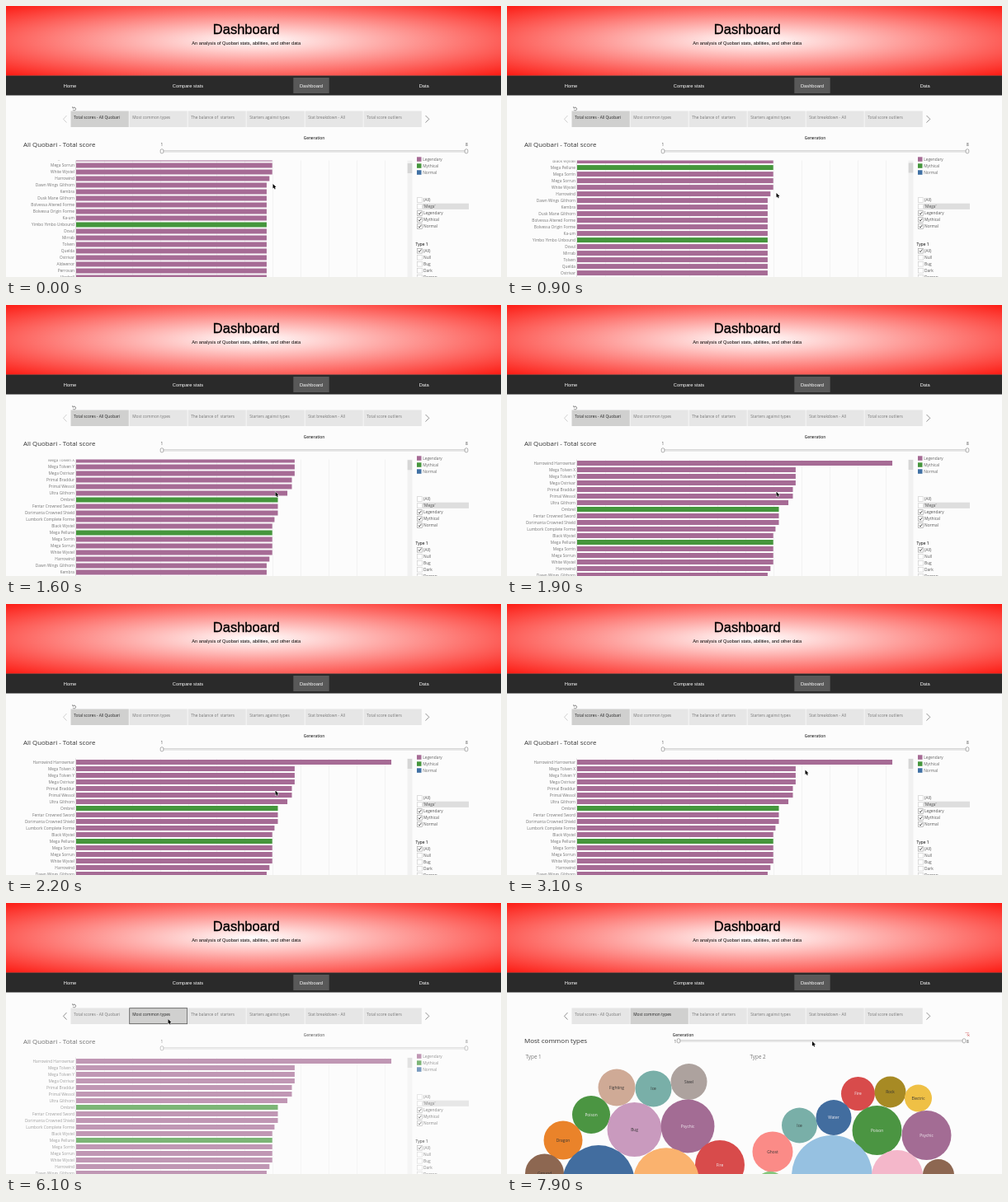
An HTML page with a canvas that plays this animation: 600 by 329 pixels, repeating every 8 s.

```html
<!DOCTYPE html>
<html lang="en">
<head>
<meta charset="utf-8">
<title>Dashboard</title>
<style>
html, body { margin: 0; width: 600px; height: 329px; overflow: hidden; background: #fcfcfc; }
canvas { display: block; width: 600px; height: 329px; }
</style>
</head>
<body>
<canvas id="stage"></canvas>
<script>
const LOOP = 8000, STEP = 100, ROW = 8;
const SELECT = 5900, SWAP = 6500;
const SANS = '"Open Sans", "Noto Sans", sans-serif';
const ARIAL = '"Liberation Sans", Arial, sans-serif';
const PURPLE = '#a66b95', GREEN = '#45963c', BLUE = '#4070a4';

const canvas = document.getElementById('stage');
const c = canvas.getContext('2d');
const dpr = window.devicePixelRatio || 1;
canvas.width = 600 * dpr;
canvas.height = 329 * dpr;

// Total points, then the names that share them; * marks a mythical entry.
const groups = [
  [1125, 'Harrowind Harrowmar'],
  [780, 'Mega Tolven X', 'Mega Tolven Y', 'Mega Ostrivar'],
  [770, 'Primal Braddur', 'Primal Wessol'],
  [754, 'Ultra Gilthorn'],
  [720, '*Ombrel', 'Fentar Crowned Sword', 'Dorimanta Crowned Shield'],
  [708, 'Lumbork Complete Forme'],
  [700, 'Black Wystel', '*Mega Pellune', 'Mega Sorrin', 'Mega Sorrun', 'White Wystel'],
  [690, 'Harrowind'],
  [680, 'Dawn Wings Gilthorn', 'Kembra', 'Dusk Mane Gilthorn', 'Bolvessa Altered Forme',
    'Bolvessa Origin Forme', 'Ka-um', '*Yimbo Yimbo Unbound', 'Dovul', 'Mirrab', 'Tolven',
    'Quelda', 'Ostrivar', 'Aldwenor', 'Perrovan', 'Vindrell', 'Yorvane', 'Zemlith']
];
const rows = groups.flatMap(([points, ...names]) => names.map(name => ({ points, name })));

const tabs = ['Total scores - All Quobari', 'Most common types', 'The balance of  starters',
  'Starters against types', 'Stat breakdown - All', 'Total score outliers'];

const details = [['legend_myth:', 'Legendary'], ['Name:', 'Harrowind Harrowmar'],
  ['Species:', 'Gigantic Quobari'], ['Type 1:', 'Poison'], ['Type 2:', 'Dragon'],
  ['Attack:', '115.0'], ['Defense:', '250.0'], ['Height M:', '100.00'], ['Hp:', '255.0'],
  ['Sp Attack:', '125.0'], ['Sp Defense:', '250.0'], ['Speed:', '130.0'],
  ['Total Points:', '1,125.0'], ['Weight Kg:', '']];

const DARK = '#333', LIGHT = '#f2eef2';
const bubbles = [
  [133, 224, 22.5, '#cfaa96', 'Fighting', DARK], [177.5, 225.5, 22, '#79afa8', 'Ice', DARK],
  [220.5, 217, 22, '#ada29e', 'Steel', DARK], [102, 257, 23, '#4b9542', 'Poison', LIGHT],
  [154.5, 275, 33, '#c99abe', 'Bug', DARK], [219, 271, 32.5, '#a36c94', 'Psychic', LIGHT],
  [68, 288, 23.5, '#ea832a', 'Dragon', DARK], [258, 318, 30, '#d84b4b', 'Fire', LIGHT],
  [45.5, 328, 23.5, '#8d6751', 'Ground', DARK], [111, 337.5, 43.4, '#426d9f', 'Water', LIGHT],
  [193, 337, 39.8, '#fab26e', 'Normal', DARK],
  [425.5, 231.5, 20.5, '#d84b4b', 'Fire', LIGHT], [464.5, 229.5, 19, '#a78a24', 'Rock', DARK],
  [498.5, 237, 16.5, '#efc045', 'Electric', DARK], [354.5, 270, 21.5, '#79afa8', 'Ice', DARK],
  [396, 260.5, 21.5, '#426d9f', 'Water', LIGHT], [448.5, 276, 30, '#4b9542', 'Poison', LIGHT],
  [508.5, 282, 30, '#a36c94', 'Psychic', LIGHT], [322, 302, 24.5, '#fb8b87', 'Ghost', DARK],
  [394, 331, 49, '#96c1e1', '', DARK], [473, 331, 31, '#f4b7ca', 'Fairy', DARK],
  [523, 330, 19, '#8d6751', '', DARK], [319, 345, 19, '#86c67c', '', DARK]
];

const scrollKeys = [[700, 110.5], [1200, 64], [1600, 11.5], [1800, 0]];
const cursorKeys = [[0, 323.5, 216], [600, 326.5, 227], [2600, 326.5, 226.5], [3300, 375.5, 191.5],
  [4800, 375.5, 191.5], [5600, 196.5, 141], [7100, 196.5, 141], [7700, 370, 168]];

// Linear track through [time, ...values] keys.
function track(keys, t) {
  const next = keys.findIndex(k => k[0] > t);
  if (next < 0) return keys[keys.length - 1].slice(1);
  if (next === 0) return keys[0].slice(1);
  const a = keys[next - 1], b = keys[next];
  const p = (t - a[0]) / (b[0] - a[0]);
  return a.slice(1).map((v, i) => v + (b[i + 1] - v) * p);
}

function rect(x, y, w, h, fill) {
  c.fillStyle = fill;
  c.fillRect(x, y, w, h);
}

function text(s, x, y, size, fill, { align = 'left', font = SANS, weight = 400 } = {}) {
  c.font = `${weight} ${size}px ${font}`;
  c.textAlign = align;
  c.textBaseline = 'alphabetic';
  c.fillStyle = fill;
  c.fillText(s, x, y + size * 0.36);
}

function line(points, color, width = 0.7) {
  c.beginPath();
  points.forEach(([x, y]) => c.lineTo(x, y));
  c.strokeStyle = color;
  c.lineWidth = width;
  c.stroke();
}

function disc(x, y, r, fill) {
  c.beginPath();
  c.arc(x, y, r, 0, 7);
  c.fillStyle = fill;
  c.fill();
}

function header() {
  c.save();
  c.translate(300, 42);
  c.scale(300, 42);
  const glow = c.createRadialGradient(0, 0, 0, 0, 0, Math.SQRT2);
  glow.addColorStop(0, '#fff');
  glow.addColorStop(1, '#fc1c14');
  rect(-1, -1, 2, 2.02, glow);
  c.restore();

  const arial = { align: 'center', font: ARIAL };
  text('Dashboard', 291.2, 28.5, 16.5, '#000', arial);
  c.strokeStyle = '#000';
  c.lineWidth = 0.35;
  c.strokeText('Dashboard', 291.2, 28.5 + 16.5 * 0.36);
  text('An analysis of Quobari stats, abilities, and other data', 291.2, 44.7, 5.65, '#000', arial);

  rect(0, 84.5, 600, 24, '#2a2a2a');
  rect(348.3, 87, 43.4, 19, '#595959');
  [['Home', 77.5], ['Compare stats', 220.5], ['Dashboard', 370], ['Data', 506.7]]
    .forEach(([s, x]) => text(s, x, 96.7, 5.75, '#fff', arial));
}

function tabStrip(active, outlined) {
  tabs.forEach((name, i) => {
    const x = 78.5 + 71 * i, on = i === active;
    rect(x, 127.5, 70.3, 19.5, on ? '#d0d0cf' : '#e6e6e6');
    text(name, x + 3.7, 135.2, 4.83, on ? '#222' : '#777');
    if (on && outlined) {
      c.strokeStyle = '#555';
      c.lineWidth = 0.8;
      c.strokeRect(x + 0.2, 127.7, 70, 19);
    }
  });
  line([[73.5, 133], [69.5, 137.3], [73.5, 141.6]], active ? '#777' : '#c4c4c4', 0.8);
  line([[508.5, 133], [512.8, 137.3], [508.5, 141.6]], '#777', 0.8);
}

function undoIcon() {
  c.beginPath();
  c.arc(82.7, 125, 1.9, -2.3, 2.6);
  c.strokeStyle = '#666';
  c.lineWidth = 0.7;
  c.stroke();
  line([[80.6, 122], [80.8, 124], [82.7, 123.8]], '#666', 0.6);
}

function slider(x1, x2, y) {
  line([[x1, y - 0.7], [x2, y - 0.7]], '#aaa', 0.5);
  line([[x1, y + 0.7], [x2, y + 0.7]], '#aaa', 0.5);
  [x1, x2].forEach(x => {
    c.beginPath();
    c.roundRect(x - 1.8, y - 2.5, 3.6, 5, 1.5);
    c.fillStyle = '#fff';
    c.fill();
    c.strokeStyle = '#777';
    c.lineWidth = 0.6;
    c.stroke();
  });
}

function checkbox(name, y, checked) {
  rect(498.6, y - 2.9, 5.8, 5.8, '#fff');
  c.strokeStyle = checked ? '#999' : '#c8c8c8';
  c.lineWidth = 0.6;
  c.strokeRect(498.6, y - 2.9, 5.8, 5.8);
  if (checked) line([[499.9, y], [501.1, y + 1.5], [503.3, y - 1.7]], '#333', 0.8);
  text(name, 506, y, 4.83, '#555');
}

function sidePanel() {
  [['Legendary', PURPLE], ['Mythical', GREEN], ['Normal', BLUE]].forEach(([name, fill], i) => {
    rect(498, 183.3 + i * 8, 5.5, 5.5, fill);
    text(name, 505.2, 186 + i * 8, 4.83, '#666');
  });
  rect(505, 239.7, 56, 7.2, '#dedede');
  ['(All)', "'Mega'", 'Legendary', 'Mythical', 'Normal']
    .forEach((name, i) => checkbox(name, 235.6 + i * 8, i > 1));
  text('Type 1', 496.6, 289.3, 4.75, '#333', { weight: 600 });
  ['(All)', 'Null', 'Bug', 'Dark', 'Dragon']
    .forEach((name, i) => checkbox(name, 297.2 + i * 8, i === 0));
}

function barPage(scroll) {
  text('All Quobari - Total score', 21, 167.7, 7.9, '#333');
  text('Generation', 373.5, 160, 4.7, '#333', { align: 'center', weight: 600 });
  text('1', 189, 168, 4.83, '#444', { align: 'center' });
  text('8', 558.5, 168, 4.83, '#444', { align: 'center' });
  slider(189, 558, 176.3);

  c.save();
  c.beginPath();
  c.rect(0, 187.6, 485, 142);
  c.clip();
  for (let x = 119; x < 485; x += 34) rect(x, 187, 0.6, 142, '#ececec');
  rect(84.3, 187, 0.6, 142, '#ccc');
  rows.forEach(({ points, name }, i) => {
    const y = 192 + i * ROW - scroll, mythical = name[0] === '*';
    rect(85, y - 3, points * 0.3396, 6, mythical ? GREEN : PURPLE);
    text(name.replace('*', ''), 83, y, 4.8, '#777', { align: 'right' });
  });
  c.restore();

  rect(486.5, 187.6, 6, 142, '#f1f1f1');
  rect(486.7, 188 + scroll * 0.027, 5.6, 12, '#d6d6d6');
  sidePanel();
}

function tooltip() {
  c.save();
  c.shadowColor = 'rgba(0,0,0,.15)';
  c.shadowBlur = 2 * dpr;
  rect(381.3, 198, 97.7, 110.5, '#fff');
  c.restore();
  c.strokeStyle = '#c4c4c4';
  c.lineWidth = 0.6;
  c.strokeRect(381.3, 198, 97.7, 110.5);
  details.forEach(([label, value], i) => {
    const y = 206.5 + i * 7.2;
    text(label, 386.5, y, 4.85, '#777');
    text(value, 421, y, 4.85, '#222');
  });
}

function bubblePage() {
  text('Most common types', 21, 167, 8, '#333');
  text('Generation', 200.8, 160, 4.7, '#333', { weight: 600 });
  text('1', 204, 168, 4.83, '#444', { align: 'center' });
  text('8', 558.5, 168.5, 4.83, '#444', { align: 'center' });
  slider(208, 554, 167.3);
  line([[555.3, 157.5], [559.8, 157.5], [558, 159.5], [558, 161]], '#d88', 0.6);
  line([[558.5, 159.5], [560.5, 161.7]], '#c44', 0.6);
  line([[560.5, 159.5], [558.5, 161.7]], '#c44', 0.6);
  text('Type 1', 22.5, 187.2, 6.3, '#777');
  text('Type 2', 294.5, 187.2, 6.3, '#777');
  bubbles.forEach(([x, y, r, fill, name, ink]) => {
    disc(x, y, r, fill);
    text(name, x, y, 4.83, ink, { align: 'center' });
  });
}

function cursor(x, y) {
  c.save();
  c.translate(x, y);
  c.beginPath();
  [[0, 0], [0, 5.6], [1.3, 4.4], [2.2, 6.4], [3.2, 6], [2.3, 4], [4, 4]]
    .forEach(p => c.lineTo(...p));
  c.closePath();
  c.lineJoin = 'round';
  c.strokeStyle = '#fff';
  c.lineWidth = 1;
  c.stroke();
  c.fillStyle = '#000';
  c.fill();
  c.restore();
}

function draw(t) {
  const picked = t >= SELECT, swapped = t >= SWAP;
  c.setTransform(dpr, 0, 0, dpr, 0, 0);
  rect(0, 0, 600, 329, '#fcfcfc');
  header();
  if (swapped) {
    bubblePage();
  } else {
    barPage(track(scrollKeys, t)[0]);
    if (picked) rect(0, 150, 600, 179, 'rgba(252,252,252,.3)');
    undoIcon();
  }
  tabStrip(picked ? 1 : 0, picked && t < 7200);
  if (t >= 3400 && t < 4800) tooltip();
  cursor(...track(cursorKeys, t));
}

function frame(now) {
  draw(Math.floor(now % LOOP / STEP) * STEP);
  requestAnimationFrame(frame);
}
requestAnimationFrame(frame);
</script>
</body>
</html>
```
